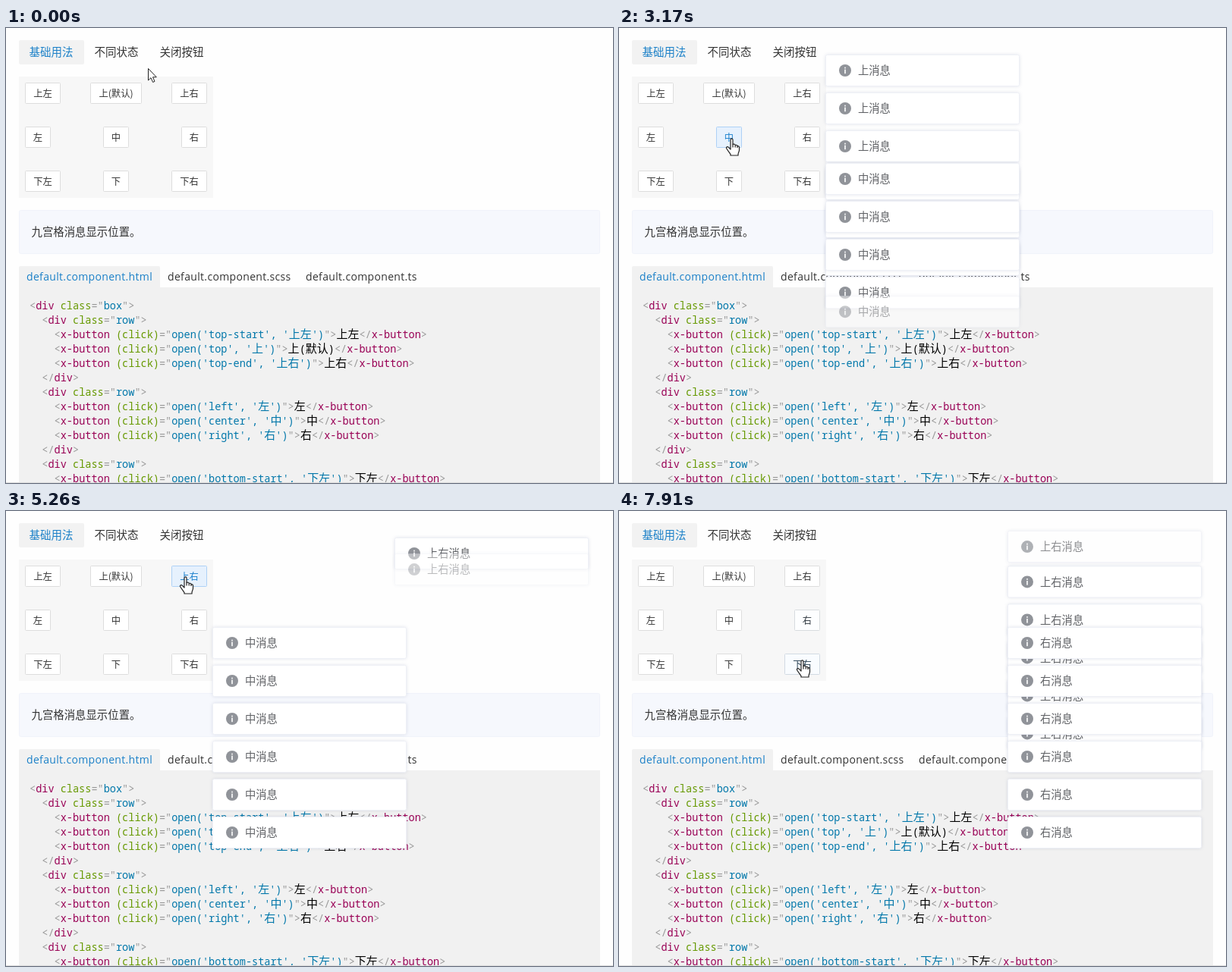
An HTML page for the animation above (8000 ms loop, 800 px wide and 600 px high).

```html
<!DOCTYPE html>
<html lang="zh">
<head>
<meta charset="utf-8">
<style>
  html, body { margin: 0; width: 100%; height: 100%; overflow: hidden; background: #fefefe; }
  svg { display: block; width: 800px; height: 600px; }
  text { font-family: "Noto Sans CJK SC", "Noto Sans CJK", sans-serif; white-space: pre; }
  .code { font: 13.57px "Noto Sans Mono", monospace; }
  .code .cjk { font: 15px "Noto Sans CJK SC", "Noto Sans CJK", sans-serif; }
  .file { font: 14px "Open Sans", "Noto Sans", sans-serif; letter-spacing: .33px; }
  .box { filter: drop-shadow(0 0 2px rgba(70, 80, 130, .15)); }
</style>
</head>
<body>
<svg id="stage" viewBox="0 0 800 600"></svg>
<script>
const LOOP = 8000, LIFE = 3000, ENTER = 240, LEAVE = 250, FADE = 300, SLOT = 50;
const BLUE = '#1b80c8', INK = '#333';
const stage = document.getElementById('stage');

function add(parent, tag, attrs = {}, text) {
  const el = document.createElementNS('http://www.w3.org/2000/svg', tag);
  for (const key in attrs) el.setAttribute(key, attrs[key]);
  if (text !== undefined) el.textContent = text;
  parent.appendChild(el);
  return el;
}
const rect = (parent, x, y, width, height, fill, extra) =>
  add(parent, 'rect', { x, y, width, height, fill, ...extra });
const label = (parent, x, y, size, fill, text, extra) =>
  add(parent, 'text', { x, y, 'font-size': size, fill, ...extra }, text);
const clamp = v => Math.max(0, Math.min(1, v));
const mix = (a, b, k) => `rgb(${a.map((v, i) => Math.round(v + (b[i] - v) * k))})`;

// Page
rect(stage, 0, 0, 800, 600, '#fefefe');
rect(stage, 17, 16, 86, 32, '#f2f2f2', { rx: 2 });
['基础用法', '不同状态', '关闭按钮'].forEach((s, i) =>
  label(stage, 30.5 + 86 * i, 37.3, 14.5, i ? INK : BLUE, s));
rect(stage, 17, 64, 256, 160, '#f7f7f7');
rect(stage, 17.5, 240.5, 765, 57, '#f6f8fd', { stroke: '#f0f3fa', rx: 2 });
label(stage, 33.5, 274.3, 14.4, INK, '九宫格消息显示位置。');
rect(stage, 17, 314, 186, 30, '#f1f1f1', { rx: 2 });
rect(stage, 17, 342, 766, 258, '#f1f1f1');
[[27, 'html'], [213, 'scss'], [395, 'ts']].forEach(([x, ext], i) =>
  add(stage, 'text', { x, y: 333, class: 'file', fill: i ? INK : BLUE }, 'default.component.' + ext));

// Code listing
let lineY = 371;
function codeLine(indent, parts) {
  const line = add(stage, 'text', { x: 31 + indent * 16.3, y: lineY, class: 'code' });
  for (const [fill, text] of parts)
    for (const run of text.match(/[\u4e00-\u9fff]+|[^\u4e00-\u9fff]+/g))
      add(line, 'tspan', { fill, class: run > '\u4e00' ? 'cjk' : 'latin' }, run);
  lineY += 19;
}
const GREY = '#999', TAG = '#990055', ATTR = '#669900', VALUE = '#0077aa';
const open = (tag, attr, value) => [
  [GREY, '<'], [TAG, tag + ' '], [ATTR, attr], [GREY, '="'], [VALUE, value], [GREY, '">']];
const close = tag => [[GREY, '</'], [TAG, tag], [GREY, '>']];
const divLine = (indent, cls) => codeLine(indent, open('div', 'class', cls));
const buttonLine = (place, name, note = '') => codeLine(2, [
  ...open('x-button', '(click)', `open('${place}', '${name}')`), ['#000', name + note], ...close('x-button')]);

divLine(0, 'box');
[
  [['top-start', '上左'], ['top', '上', '(默认)'], ['top-end', '上右']],
  [['left', '左'], ['center', '中'], ['right', '右']],
  [['bottom-start', '下左']]
].forEach((row, i) => {
  divLine(1, 'row');
  row.forEach(args => buttonLine(...args));
  if (i < 2) codeLine(1, close('div'));
});
rect(stage, 0, 599, 800, 1, '#dedede');

// Buttons: text, x, y, width, hover start, hover end
const buttons = [
  ['上左', 25, 72, 47], ['上(默认)', 111, 72, 68, 400, 1960], ['上右', 218, 72, 47, 4180, 6010],
  ['左', 25, 130, 34], ['中', 128, 130, 34, 2130, 3680], ['右', 231, 130, 34, 6300, 7640],
  ['下左', 25, 188, 47], ['下', 128, 188, 34], ['下右', 218, 188, 47, 7840, 9000]
].map(([text, x, y, w, from, to]) => ({
  from, to,
  frame: rect(stage, x + .5, y + .5, w - 1, 27, '#fff', { stroke: '#ddd', rx: 1 }),
  text: label(stage, x + w / 2, y + 19, 12.3, INK, text, { 'text-anchor': 'middle' })
}));

// Message stacks
function makeMessage(x, text, born) {
  const g = add(stage, 'g');
  rect(g, x + .5, .5, 255, 41, '#fff', { class: 'box', stroke: '#eef0f6', rx: 2 });
  add(g, 'circle', { cx: x + 26, cy: 21, r: 8, fill: '#909399' });
  rect(g, x + 25.2, 16.7, 1.6, 1.7, '#fff');
  rect(g, x + 25.2, 19.6, 1.6, 5.6, '#fff');
  label(g, x + 43, 26.2, 14.3, '#606266', text);
  return { g, born };
}
const stack = (x, text, centered, births) =>
  ({ centered, items: births.map(b => makeMessage(x, text, b)) });
const every = (start, step) => Array.from({ length: 6 }, (_, i) => start + step * i);
const stacks = [
  stack(272, '上消息', false, [645, 830, 1060, 1240, 1420, 1600]),
  stack(272, '中消息', true, every(2490, 140)),
  stack(512, '上右消息', false, [4848, 5160, 5340, 5500, 5660, 5820]),
  stack(512, '右消息', true, every(6640, 150))
];

// Pointer
const cursor = add(stage, 'g', { 'stroke-linejoin': 'round' });
const arrow = add(cursor, 'path', {
  d: 'M.5 .5V16L4 12.7L6.6 18.5L9 17.4L6.5 11.8H11.3Z', fill: '#fff', stroke: '#222'
});
const hand = add(cursor, 'g', {
  fill: '#fff', stroke: '#222', 'stroke-width': 1.2, transform: 'translate(0 -1)'
});
add(hand, 'path', {
  d: 'M-2 1.5C-2-.6 1-.6 1 1.5V7.5C3 6.5 4 7.5 4.2 8.5C6 7.8 7 8.8 7 9.8C8.5 9.3 9.5 10 9.5 11.5V15' +
     'C9.5 17 8 18.5 8 20.5V22H-2V20.5C-3 18.5-5.5 16-7.5 12.5C-8 11-6 10-4.8 11.2L-2 14Z'
});
add(hand, 'path', { d: 'M1 7.5V11.5M4.2 8.5V11.5M7 9.8V12', fill: 'none' });

const path = [
  [70, 187, 53], [480, 145, 86], [1850, 145, 86], [2200, 149, 147], [3600, 149, 147],
  [3790, 203, 147], [4010, 227, 118], [4250, 237, 88], [5900, 237, 88],
  [6350, 247, 138], [7560, 247, 138], [7870, 242, 198]
];
function pointerAt(t) {
  const i = path.findIndex(k => k[0] > t);
  if (i < 1) return (i ? path[path.length - 1] : path[0]).slice(1);
  const [t0, x0, y0] = path[i - 1], [t1, x1, y1] = path[i];
  const k = (t - t0) / (t1 - t0);
  return [x0 + (x1 - x0) * k, y0 + (y1 - y0) * k];
}

function drawStack({ items, centered }, t) {
  const leaving = m => clamp((t - m.born - LIFE) / LEAVE);
  const slot = m => t < m.born ? 0 : SLOT * (1 - leaving(m));
  let y = centered ? 303 - items.reduce((sum, m) => sum + slot(m), 0) / 2 : 35;
  for (const m of items) {
    const enter = clamp((t - m.born) / ENTER), left = 1 - leaving(m);
    const shift = -SLOT * (1 - enter) - 13 * (1 - left ** 4);
    const alpha = enter * left ** 1.15;
    m.g.setAttribute('transform', `translate(0 ${y + shift})`);
    m.g.setAttribute('opacity', alpha);
    m.g.setAttribute('display', alpha > 0 ? 'inline' : 'none');
    y += slot(m);
  }
}

function draw(t) {
  let over = false;
  for (const { from, to, frame, text } of buttons) {
    if (!from) continue;
    const k = clamp((t - from) / FADE) * (1 - clamp((t - to) / FADE));
    over = over || (t >= from && t < to);
    frame.setAttribute('fill', mix([255, 255, 255], [230, 241, 253], k));
    frame.setAttribute('stroke', mix([221, 221, 221], [174, 209, 246], k));
    text.setAttribute('fill', mix([51, 51, 51], [27, 128, 205], k));
  }
  stacks.forEach(s => drawStack(s, t));
  const [x, y] = pointerAt(t);
  cursor.setAttribute('transform', `translate(${Math.round(x)} ${Math.round(y)})`);
  arrow.setAttribute('display', over ? 'none' : 'inline');
  hand.setAttribute('display', over ? 'inline' : 'none');
}

const start = performance.now();
function tick() {
  draw((performance.now() - start) % LOOP);
  requestAnimationFrame(tick);
}
tick();
</script>
</body>
</html>
```
